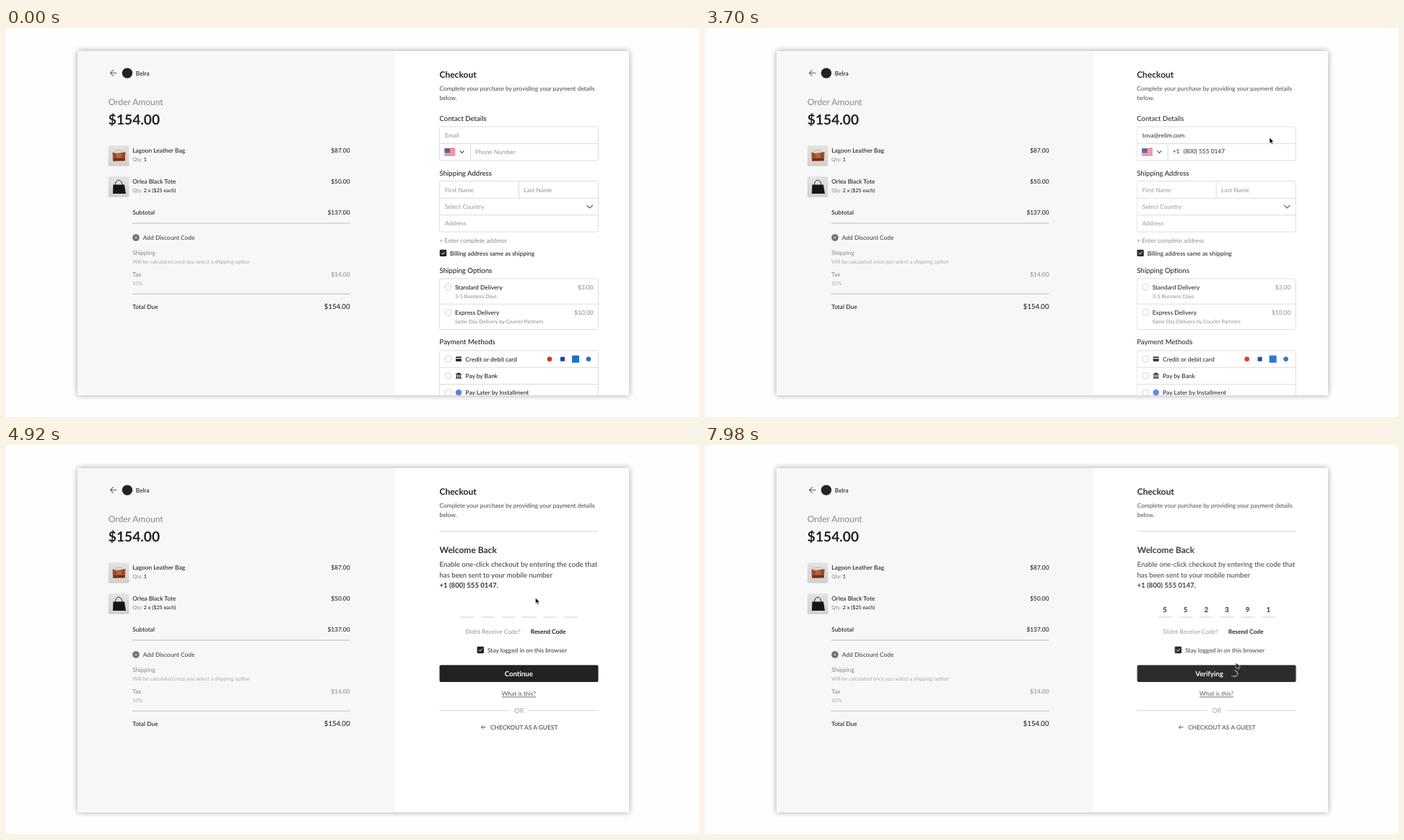
Recreate the animation shown at these times as an HTML page. Size 960x540 px, loop 8 s.

```html
<!DOCTYPE html>
<html lang="en">
<head>
<meta charset="utf-8">
<title>Checkout</title>
<style>
html, body { margin: 0; width: 100%; height: 100%; overflow: hidden; background: #fefefe; }
svg { display: block; width: 960px; height: 540px; }
text { font-family: Lato, sans-serif; text-rendering: geometricPrecision; white-space: pre; }

.form { animation: form 8s linear infinite; }
.verify { animation: verify 8s linear infinite; }
.cursor { animation: cursor 8s ease-in-out infinite; }
.spinner { animation: spin 1s linear infinite; }
/* Switched for half a loop, beginning at --t */
.on, .off { animation: 8s step-end calc(var(--t) * 1ms - 8s) infinite; }
.on { animation-name: show; }
.off { animation-name: hide; }

@keyframes show { 0% { visibility: visible } 50%, 100% { visibility: hidden } }
@keyframes hide { 0% { visibility: hidden } 50%, 100% { visibility: visible } }
@keyframes spin { to { transform: rotate(360deg) } }
@keyframes form {
  0% { transform: none; opacity: 1 }
  45.3% { transform: none; opacity: 1; animation-timing-function: ease-in }
  50.3%, 100% { transform: translateX(-40px); opacity: 0 }
}
@keyframes verify {
  0%, 51.2% { transform: translateX(40px); opacity: 0; animation-timing-function: ease-out }
  56.25% { transform: none; opacity: 1 }
  98.9% { transform: none; opacity: 1; animation-timing-function: ease-in }
  100% { transform: translateX(-2.8px); opacity: .93 }
}
@keyframes cursor {
  0% { transform: translate(700px, 516px) }
  10.5% { transform: translate(640px, 172px) }
  13.1% { transform: translate(629px, 143px) }
  15.6%, 30.75% { transform: translate(631.5px, 149.5px) }
  33.75% { transform: translate(700px, 172px) }
  40% { transform: translate(828px, 176px) }
  46.25% { transform: translate(782px, 152px) }
  53.5% { transform: translate(765.5px, 159.5px) }
  61.5% { transform: translate(733.5px, 212px) }
  71.75% { transform: translate(714px, 222px) }
  76%, 77% { transform: translate(708.5px, 226.5px) }
  81% { transform: translate(722px, 312px) }
  91% { transform: translate(726px, 311px) }
  99.75%, 100% { transform: translate(735.5px, 302px) }
}
</style>
</head>
<body>
<svg id="stage" viewBox="0 0 960 540" xmlns="http://www.w3.org/2000/svg"></svg>
<script>
const DARK = '#222', BODY = '#444', GRAY = '#888', PALE = '#aaa', HINT = '#949494', LINE = '#dcdcdc';

// y is the middle of the capitals
const text = (x, y, str, { size = 8.4, weight = 400, fill = DARK, anchor = 'start', more = '' } = {}) =>
  `<text x="${x}" y="${y + size * .36}" font-size="${size}" font-weight="${weight}" fill="${fill}" text-anchor="${anchor}" ${more}>${str}</text>`;
const medium = (x, y, str, opts) => text(x, y, str, { weight: 500, ...opts });
const hint = (x, y, str, more) => text(x, y, str, { fill: HINT, more });
const rect = (x, y, w, h, fill, more = '') =>
  `<rect x="${x}" y="${y}" width="${w}" height="${h}" fill="${fill}" ${more}/>`;
const circle = (x, y, r, fill, more = '') => `<circle cx="${x}" cy="${y}" r="${r}" fill="${fill}" ${more}/>`;
const path = (d, stroke, width = 1, more = '') =>
  `<path d="${d}" fill="none" stroke="${stroke}" stroke-width="${width}" ${more}/>`;
const at = (kind, t) => `class="${kind}" style="--t:${t}"`;
const typed = (str, start, step) =>
  [...str].map((c, i) => `<tspan ${at('on', start + step * (i + 1))}>${c}</tspan>`).join('');

const box = (y, h, dividers) =>
  rect(600.5, y, 220, h, '#fff', `rx="2" stroke="${LINE}"`) +
  dividers.map(d => path(`M600.5 ${d}h220`, LINE)).join('');
const radio = y => circle(612.6, y, 4.4, '#fff', 'stroke="#ccc"');
const checkbox = (x, y) =>
  rect(x, y - 4.7, 9.4, 9.4, DARK, 'rx="1.4"') +
  path(`M${x + 2.4} ${y}l1.7 1.8 3.1-3.5`, '#fff');
const heading = () =>
  text(600.5, 64.3, 'Checkout', { size: 12, weight: 700 }) +
  text(600.5, 83.7, 'Complete your purchase by providing your payment details', { fill: BODY }) +
  text(600.5, 96.7, 'below.', { fill: BODY });
const section = (y, str) => medium(600.5, y, str, { size: 9.6 });

function product(y, name, qty, price, bag) {
  return rect(141.8, y - 6.5, 28.6, 28.6, 'url(#photo)', 'rx="1.5"') + bag +
    medium(175.2, y, name) +
    text(175.2, y + 13, `Qty: <tspan fill="${DARK}" font-weight="500">${qty}</tspan>`, { size: 7.2, fill: GRAY }) +
    medium(476.5, y, price, { anchor: 'end' });
}

function summary() {
  const right = { anchor: 'end' };
  const redBag = path('M149 173q7-7 14 0', '#c9a48c', .8) +
    `<path d="M147.5 172.5l5 1.5 8-1 5-1-.6 12.4-16.6.6z" fill="#9c4a2b"/>` +
    rect(153, 174, 7, 6, '#b9643c') + rect(148.5, 181, 16, 3, '#713019');
  const blackBag = path('M151.5 218c0-9 9-9 9.5 0', '#222', 1) +
    `<path d="M148.5 217.5h15.500l2 12.500h-18z" fill="#151515"/>`;
  return path('M153.500 62.500h-9m4.200-4.200l-4.200 4.200 4.200 4.200', '#666', 1.1) +
    circle(168, 62.6, 7.2, '#222') +
    medium(179.8, 62.6, 'Belra') +
    text(141.8, 102.8, 'Order Amount', { size: 12, fill: GRAY }) +
    text(141.8, 127.5, '$154.00', { size: 19.2, weight: 700 }) +
    product(169.7, 'Lagoon Leather Bag', '1', '$87.00', redBag) +
    product(212.7, 'Orlea Black Tote', '2 x ($25 each)', '$50.00', blackBag) +
    medium(175.2, 255.7, 'Subtotal') + medium(476.5, 255.7, '$137.00', right) +
    path('M175 271h301.500M175 369.200h301.500', '#d2d2d2', 1.4) +
    circle(180, 291, 4.8, '#707070') + path('M178.300 292.700l3.400-3.400m-3.400 0l3.400 3.400', '#ddd', .8) +
    text(189.7, 291, 'Add Discount Code', { weight: 600, fill: '#555' }) +
    text(175.2, 312, 'Shipping', { fill: GRAY }) +
    text(175.2, 324.8, 'Will be calculated once you select a shipping option', { size: 7.2, fill: PALE }) +
    text(175.2, 341.9, 'Tax', { fill: GRAY }) + text(476.5, 341.9, '$14.00', { fill: GRAY, ...right }) +
    text(175.2, 354.8, '10%', { size: 7.2, fill: PALE }) +
    medium(175.2, 386.6, 'Total Due') + medium(476.5, 386.6, '$154.00', { size: 9.6, ...right });
}

function flag() {
  const stripes = [1, 3, 5].map(i => rect(607.6, 167 + i * 1.44, 14.6, 1.44, '#f6e9ea')).join('');
  return rect(607.6, 167, 14.6, 10.1, '#dc4a58') + stripes + rect(607.6, 167, 7.4, 5.8, '#52629f');
}

function delivery(y, name, note, price) {
  return radio(y) + medium(622, y, name) +
    text(622, y + 13, note, { size: 7.2, fill: GRAY }) +
    text(813.6, y, price, { fill: GRAY, anchor: 'end' });
}

const payment = (y, name, icon) => radio(y) + icon + medium(636.5, y, name);

function form() {
  const cardIcon = rect(623, 456.3, 8, 6.4, DARK, 'rx=".8"') + rect(623, 458, 8, 1.2, '#fff');
  const bankIcon = `<path d="M623 481.500v-1l4-2.300 4 2.300v1z" fill="${DARK}"/>` +
    path('M624.500 482v3.400m2.500-3.400v3.400m2.500-3.400v3.400', DARK, 1.3) + rect(623, 485.3, 8, 1.3, DARK);
  return heading() +
    section(125.2, 'Contact Details') +
    box(137, 47, [160.5]) + path('M643.500 160.500v23.500', LINE) +
    hint(608, 148.8, 'Email', at('off', 1040)) +
    text(608, 148.8, typed('tova@relim.com', 980, 66)) +
    flag() + path('M628.700 170.500l2.900 2.900 2.900-2.900', '#555', 1.1) +
    hint(650, 172, 'Phone Number', at('off', 2750)) +
    text(650, 171.4, typed('+1', 2700, 45)) + text(665, 171.4, typed('(800) 555 0147', 2790, 45)) +
    section(201.2, 'Shipping Address') +
    box(212.7, 70.3, [236.3, 259.7]) + path('M710.500 212.700v23.600', LINE) +
    hint(608, 224.6, 'First Name') + hint(717.3, 224.6, 'Last Name') +
    hint(608, 248.1, 'Select Country') + path('M804.500 245.800l4.200 4.200 4.200-4.200', '#555', 1.2) +
    hint(608, 271.4, 'Address') +
    text(600.5, 294.6, '+ Enter complete address', { fill: GRAY }) +
    checkbox(600.8, 312.4) + medium(615, 312.6, 'Billing address same as shipping') +
    section(336.2, 'Shipping Options') +
    box(348, 70.5, [383.2]) +
    delivery(359.6, 'Standard Delivery', '3-5 Business Days', '$3.00') +
    delivery(394.9, 'Express Delivery', 'Same Day Delivery by Courier Partners', '$10.00') +
    section(436, 'Payment Methods') +
    box(447.8, 80, [471.3, 494.5]) +
    payment(459.6, 'Credit or debit card', cardIcon) +
    payment(482.8, 'Pay by Bank', bankIcon) +
    payment(506.2, 'Pay Later by Installment', circle(627, 506, 4.2, '#5c84d6')) +
    circle(753, 459.6, 3.3, '#eb2a1b') + rect(768, 456.6, 6, 6, '#1f3fa8') +
    rect(784, 454.6, 10, 10, '#1f72cd') + circle(807, 459.6, 3.3, '#2a6fc9');
}

function verify() {
  const middle = { anchor: 'middle' };
  const slots = [...'552391'].map((digit, i) => {
    const x = 638.8 + 28.7 * i;
    return path(`M${x - 9.6} 239h19.200`, '#cfcfcf') +
      text(x, 228.7, digit, { size: 9.6, weight: 700, more: at('on', 5020 + 190 * i), ...middle });
  }).join('');
  const label = { size: 9.6, weight: 700, fill: '#fff' };
  return heading() +
    path('M600.500 119.800h220M600.500 368.600h97.500M723 368.600h97.500', '#d4d4d4') +
    text(600.5, 146, 'Welcome Back', { size: 12, weight: 700, fill: '#333' }) +
    medium(600.5, 166, 'Enable one-click checkout by entering the code that', { size: 9.6, fill: BODY }) +
    medium(600.5, 180.2, 'has been sent to your mobile number', { size: 9.6, fill: BODY }) +
    text(600.5, 194.5, '+1 (800) 555 0147.', { size: 9.6, weight: 700, fill: '#333' }) +
    slots +
    text(636.5, 258.8, 'Didnt Receive Code?', { fill: HINT }) +
    text(726.8, 258.8, 'Resend Code', { weight: 700 }) +
    checkbox(652.6, 284.5) + medium(667, 284.5, 'Stay logged in on this browser', { fill: BODY }) +
    rect(600.5, 305.4, 220, 23.6, DARK, 'rx="2"') +
    text(710.3, 317.5, 'Continue', { ...label, ...middle, more: at('off', 6520) }) +
    `<g ${at('on', 6520)}>` +
      text(681.3, 317.5, 'Verifying', label) +
      `<g transform="translate(735.2 317.200)"><g class="spinner">${path('M.7-4.200A4.300 4.300 0 1 1-3.700 2.200', '#fff', .9)}</g></g>` +
    '</g>' +
    text(710.4, 345.4, 'What is this?', { fill: '#555', more: 'text-decoration="underline"', ...middle }) +
    medium(710.8, 368.8, 'OR', { size: 9.6, fill: PALE, ...middle }) +
    path('M664.500 391.800h-6m2.800-2.800l-2.800 2.800 2.800 2.800', '#555') +
    text(671, 391.9, 'CHECKOUT AS A GUEST', { weight: 600, fill: '#555' });
}

document.getElementById('stage').innerHTML = `
  <defs>
    <linearGradient id="photo" x2="0" y2="1"><stop stop-color="#e3e3e2"/><stop offset="1" stop-color="#cfcfcd"/></linearGradient>
    <filter id="blur" x="-10%" y="-10%" width="120%" height="120%"><feGaussianBlur stdDeviation="4.500"/></filter>
    <clipPath id="card">${rect(99, 32, 764, 477.7, '#000')}</clipPath>
  </defs>
  ${rect(99, 32, 764, 477.7, '#000', 'opacity=".36" filter="url(#blur)"')}
  <g clip-path="url(#card)">
    ${rect(99, 32, 764, 478, '#fff')}
    ${rect(99, 32, 439, 478, '#f7f7f7')}
    ${summary()}
    <g class="form">${form()}</g>
    <g class="verify">${verify()}</g>
    <path class="cursor" d="M0 0v8.200l1.900-1.700 1.300 3 1.400-.6-1.300-2.900h2.500z" fill="#000" stroke="#fff" stroke-width=".6"/>
  </g>`;
</script>
</body>
</html>
```
